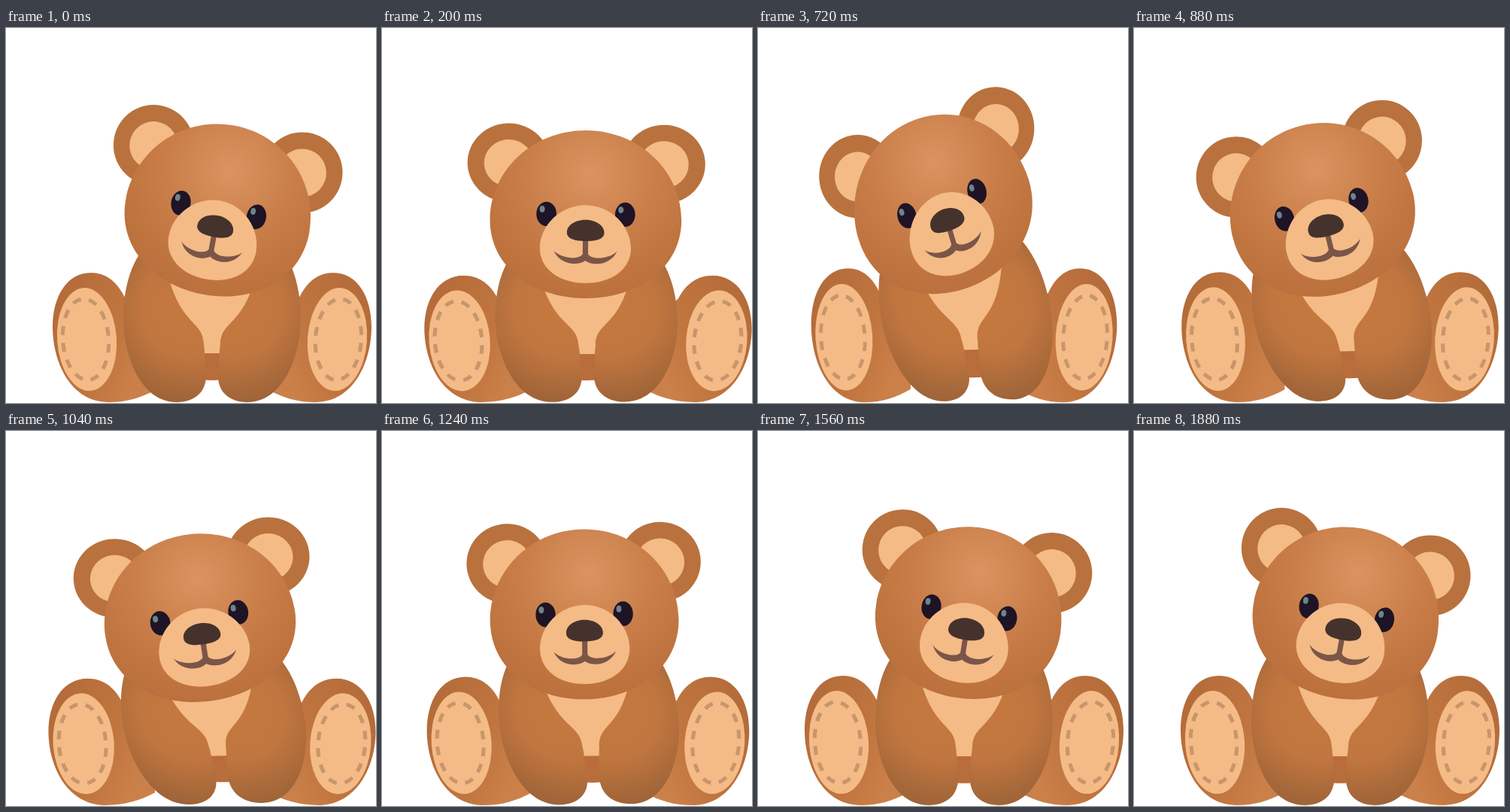
Write an HTML page that moves like this. It is 492 px wide and 498 px high and loops after 1.92 s.

```html
<!DOCTYPE html>
<html>
<head>
<meta charset="utf-8">
<style>
html, body { margin: 0; width: 100%; height: 100%; overflow: hidden; background: #fff; }
svg { display: block; }
</style>
</head>
<body>
<svg width="492" height="498" viewBox="0 0 492 498">
  <defs>
    <radialGradient id="fur" gradientUnits="userSpaceOnUse" cx="276" cy="186" r="185">
      <stop offset="0" stop-color="#db9460"/>
      <stop offset=".45" stop-color="#ca7f4a"/>
      <stop offset=".75" stop-color="#c07540"/>
      <stop offset="1" stop-color="#b86e3c"/>
    </radialGradient>
    <linearGradient id="legFur" gradientUnits="userSpaceOnUse" x1="62" y1="390" x2="185" y2="440">
      <stop offset="0" stop-color="#b46c3a"/>
      <stop offset=".6" stop-color="#c0753f"/>
      <stop offset="1" stop-color="#cb804a"/>
    </linearGradient>
    <radialGradient id="armFur" gradientUnits="userSpaceOnUse" cx="245" cy="372" r="128">
      <stop offset="0" stop-color="#c5793f"/>
      <stop offset=".5" stop-color="#c1763f"/>
      <stop offset="1" stop-color="#9d6338"/>
    </radialGradient>
    <g id="leg">
      <path fill="url(#legFur)" d="M113 325C80 325 62 358 62 397C62 442 85 497 137 497C160 497 180 491 200 480V400L157 356C147 336 132 325 113 325Z"/>
      <g transform="rotate(-4 107 413)">
        <ellipse cx="107.5" cy="413.5" rx="39.5" ry="68.5" fill="#f4bb86"/>
        <ellipse cx="106" cy="413.5" rx="30.5" ry="54" fill="none" stroke="#c8956c" stroke-width="5" pathLength="120" stroke-dasharray="5.2 4.8" stroke-dashoffset="-3.6"/>
      </g>
    </g>
    <path id="arm" fill="url(#armFur)" d="M185 290C160 320 156 360 156 387C156 432 178 497 227 497C252 497 267 482 266 460C264 442 265 432 263 420C262 388 234 397 216 330Z"/>
    <g id="ear">
      <circle cx="169.5" cy="171" r="53.5" fill="#b9723d"/>
      <circle cx="169.5" cy="171.5" r="32" fill="#f4bb86"/>
    </g>
    <g id="eye">
      <ellipse cx="219" cy="240" rx="13" ry="16.5" fill="#1e1426"/>
      <ellipse cx="213.5" cy="233.5" rx="3.4" ry="4.5" fill="#6c858b"/>
    </g>
  </defs>
  <g id="bear">
    <use href="#leg"/>
    <use href="#leg" transform="matrix(-1 0 0 1 548 0)"/>
    <g id="body">
      <path fill="#b86d3a" d="M190 300H358L345 440C325 477 223 477 203 440Z"/>
      <path fill="#f4bb86" d="M205 300H343V432H205Z"/>
      <use href="#arm"/>
      <use href="#arm" transform="matrix(-1 0 0 1 548 0)"/>
    </g>
    <g id="head">
      <use href="#ear"/>
      <use href="#ear" transform="matrix(-1 0 0 1 540 0)"/>
      <path fill="url(#fur)" d="M270 126C340 126 394 182 394 248C394 312 338 354 270 354C202 354 146 312 146 248C146 182 200 126 270 126Z"/>
      <use href="#eye"/>
      <use href="#eye" x="102"/>
      <path fill="#f4bb86" d="M270 227.500C303 227.500 329 256 329 286C329 315 303 333.500 270 333.500C237 333.500 211 315 211 286C211 256 237 227.500 270 227.500Z"/>
      <path fill="#7b5548" d="M229 290C240 301 262 302 266.500 294V272H273.500V294C278 302 300 301 311 290C302 310 279 310 270 303C261 310 238 310 229 290Z"/>
      <path fill="#46322c" d="M245.800 265C245.800 254 258 247.500 270 247.500C282 247.500 294.200 254 294.200 265C294.200 274 283 276.500 270 276.500C257 276.500 245.800 274 245.800 265Z"/>
    </g>
  </g>
</svg>
<script>
const LOOP = 1920, STEP = 40;

// Eased progress from 0 to 1 between two times.
function ease(t, from, to) {
  const u = Math.min(1, Math.max(0, (t - from) / (to - from)));
  return u * u * (3 - 2 * u);
}

const place = (id, value) => document.getElementById(id).setAttribute('transform', value);

function draw(t) {
  // The head tips over quickly and swings back slowly.
  const tilt = 10.4 - 29.6 * (ease(t, 0, 520) - ease(t, 570, 1720));
  // Squash, stretch, squash again, settle.
  const stretch = .073 * (ease(t, 170, 540) - ease(t, 660, 1080))
    - .028 * (ease(t, 0, 170) - ease(t, 1080, 1360));
  // The body follows late: it leans first, then the paws swing out.
  const sway = .16 * (ease(t, 60, 620) - ease(t, 900, 1560));
  const lean = -5 * (ease(t, 0, 400) - ease(t, 400, 720));

  place('bear', `translate(274 497) scale(${1 - stretch} ${1 + .82 * stretch}) translate(-274 -497)`);
  place('body', `translate(${lean} ${-15 * sway}) translate(274 370) matrix(1 ${-.15 * sway} ${sway} 1 0 0) translate(-274 -370)`);
  place('head', `translate(${.33 * Math.min(0, tilt) + .3} ${.5 - 50 * stretch}) rotate(${tilt} 270 309)`);
}

const start = performance.now();
function frame() {
  const t = (performance.now() - start) % LOOP;
  draw(Math.floor(t / STEP) * STEP);
  requestAnimationFrame(frame);
}
frame();
</script>
</body>
</html>
```
